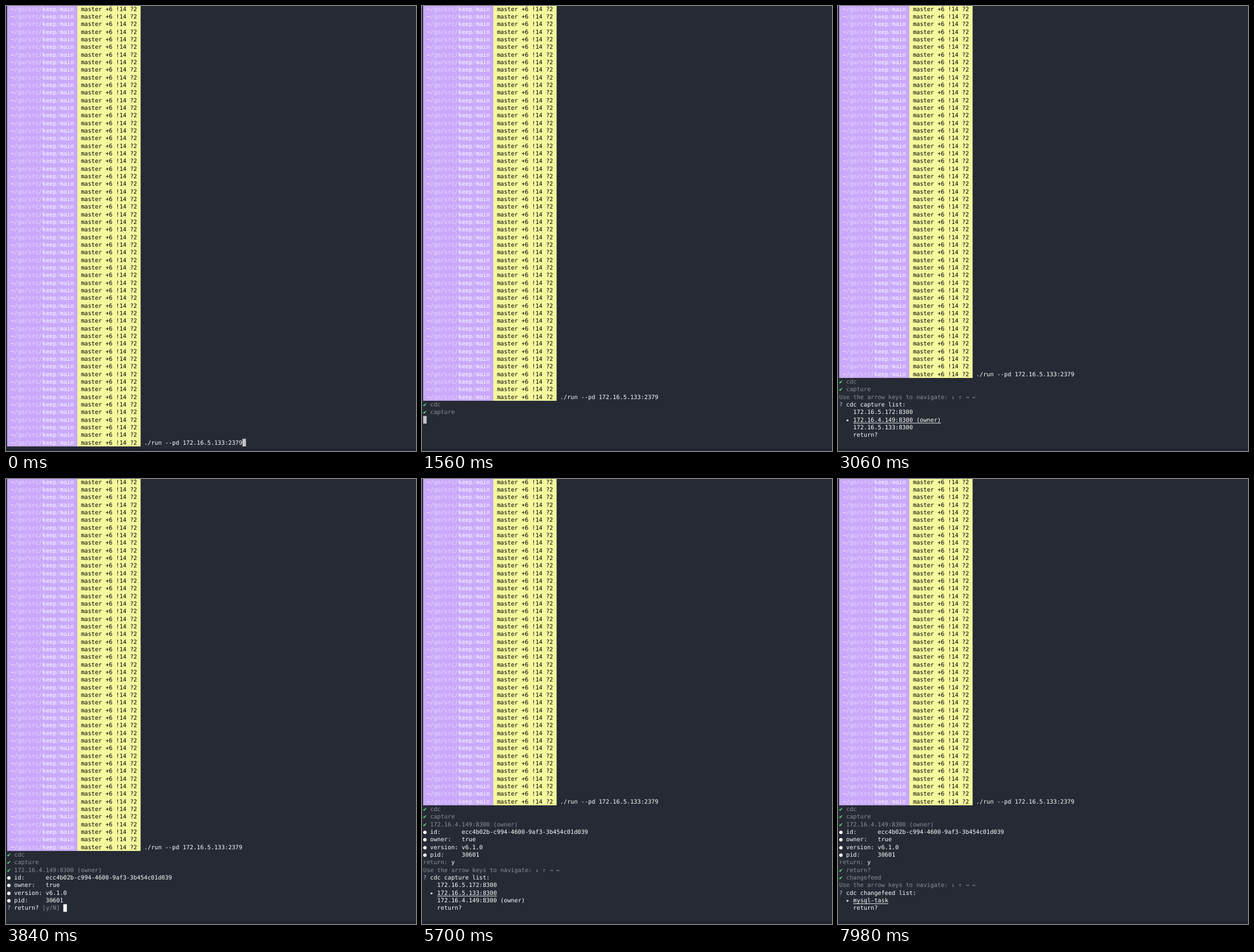
These frames come from a looping animation (718x780 px, 8000 ms). An HTML page with a canvas:

```html
<!DOCTYPE html>
<html>
<head>
<meta charset="utf-8">
<style>
  html, body { margin: 0; width: 100%; height: 100%; overflow: hidden; background: #262a34; }
  canvas { display: block; }
</style>
</head>
<body>
<canvas id="term"></canvas>
<script>
const W = 718, H = 780, LOOP = 8000;
const LEFT = 2, TOP = -1.4, COL = 6.15, ROW = 40 / 3, BASE = 10;
const BG = '#262a34', WHITE = '#ffffff', GREY = '#8c8e95', GREEN = '#5af78e',
      BLUE = '#cbbcec', PURPLE = '#caa9fa', DIM = '#e6d9fb', YELLOW = '#f4f99d', BLOCK = '#c2c3c7';

const canvas = document.getElementById('term');
const ctx = canvas.getContext('2d');
const dpr = window.devicePixelRatio || 1;
canvas.width = W * dpr;
canvas.height = H * dpr;
canvas.style.width = W + 'px';
canvas.style.height = H + 'px';

const x = col => LEFT + col * COL;
const y = row => TOP + row * ROW;

// A line is a list of [text, colour, underlined] runs.
const done = text => [['✔ ', GREEN], [text, GREY]];
const info = (key, value) => [['● ' + (key + ':').padEnd(9) + value, WHITE]];
const menu = (title, options, pick) => [
  [['Use the arrow keys to navigate: ↓ ↑ → ←', GREY]],
  [['? ', BLUE], [title + ':', WHITE]],
  ...options.map((text, i) => [[i === pick ? '  ▸ ' : '    ', WHITE], [text, WHITE, i === pick]])
];

const OWNER = '172.16.4.149:8300 (owner)';
const A = '172.16.5.172:8300', B = '172.16.5.133:8300';
const chosen = [done('cdc'), done('capture')];
const detail = [
  ...chosen, done(OWNER),
  info('id', 'ecc4b02b-c994-4600-9af3-3b454c01d039'),
  info('owner', 'true'),
  info('version', 'v6.1.0'),
  info('pid', '30601')
];
const ask = [['? ', BLUE], ['return? ', WHITE], ['[y/N] ', GREY]];
const answered = [...detail, [['return: ', GREY], ['y', WHITE]]];
const back = [...answered, done('return?')];
const feeds = [...back, done('changefeed')];

const first = menu('keep', ['cdc', 'pd', 'tikv'], 0);
const cdc = pick => menu('cdc', ['capture', 'changefeed'], pick);
const list = pick => [...chosen, ...menu('cdc capture list', [A, OWNER, B, 'return?'], pick)];
const list2 = pick => [...answered, ...menu('cdc capture list', [A, B, OWNER, 'return?'], pick)];

// [start ms, row of the command, lines below it, cursor as [column, row, colour]]
const scenes = [
  [0, 57, [], [67, 57, BLOCK]],
  [420, 51, first],
  [960, 51, [done('cdc'), ...cdc(0)]],
  [1500, 51, chosen, [0, 54, BLOCK]],
  [1620, 48, list(0)],
  [2820, 48, list(1)],
  [3120, 48, detail.slice(0, 3), [0, 52, BLOCK]],
  [3240, 48, [...detail, ask], [16, 56, WHITE]],
  [4020, 48, [...detail, [...ask, ['y', WHITE]]], [17, 56, WHITE]],
  [4140, 48, answered, [0, 57, BLOCK]],
  [4260, 42, list2(0)],
  [4860, 42, list2(1)],
  [5280, 42, list2(0)],
  [5700, 42, list2(1)],
  [6120, 42, list2(2)],
  [6420, 42, list2(3)],
  [6660, 42, [...back, ...cdc(0)]],
  [7080, 42, [...back, ...cdc(1)]],
  [7500, 42, feeds, [0, 53, BLOCK]],
  [7620, 42, [...feeds, ...menu('cdc changefeed list', ['mysql-task', 'return?'], 0)]]
];

const promptRuns = [
  [' ~', WHITE], ['/go/src/', DIM], ['keep', WHITE], ['/', DIM], ['main ', WHITE],
  [' master +6 !14 ?2 ', '#000000']
];

function write(row, runs) {
  let col = 0;
  for (const [text, color, underlined] of runs) {
    ctx.fillStyle = color;
    ctx.fillText(text, x(col), y(row) + BASE);
    if (underlined) ctx.fillRect(x(col), y(row) + BASE + 2, text.length * COL, 0.9);
    col += text.length;
  }
}

function draw([, cmdRow, lines, cursor]) {
  ctx.setTransform(dpr, 0, 0, dpr, 0, 0);
  ctx.font = '10.215px "DejaVu Sans Mono", monospace';
  ctx.textRendering = 'geometricPrecision';
  ctx.fillStyle = BG;
  ctx.fillRect(0, 0, W, H);
  ctx.fillStyle = '#21242e';
  ctx.fillRect(0, 775.5, W, H);

  const bottom = y(cmdRow + 1);
  ctx.fillStyle = PURPLE;
  ctx.fillRect(x(0), 0, 20 * COL, bottom);
  ctx.fillStyle = YELLOW;
  ctx.fillRect(x(20), 0, 18 * COL, bottom);
  for (let row = 0; row <= cmdRow; row++) write(row, promptRuns);
  write(cmdRow, [[' '.repeat(39), WHITE], ['./run --pd 172.16.5.133:2379', WHITE]]);

  lines.forEach((runs, i) => write(cmdRow + 1 + i, runs));
  if (cursor) {
    const [col, row, color] = cursor;
    ctx.fillStyle = color;
    ctx.fillRect(x(col), y(row), COL, ROW);
  }
}

let shown;
function tick() {
  const t = performance.now() % LOOP;
  const scene = scenes.findLast(s => s[0] <= t);
  if (scene !== shown) draw(shown = scene);
  requestAnimationFrame(tick);
}
tick();
</script>
</body>
</html>
```
